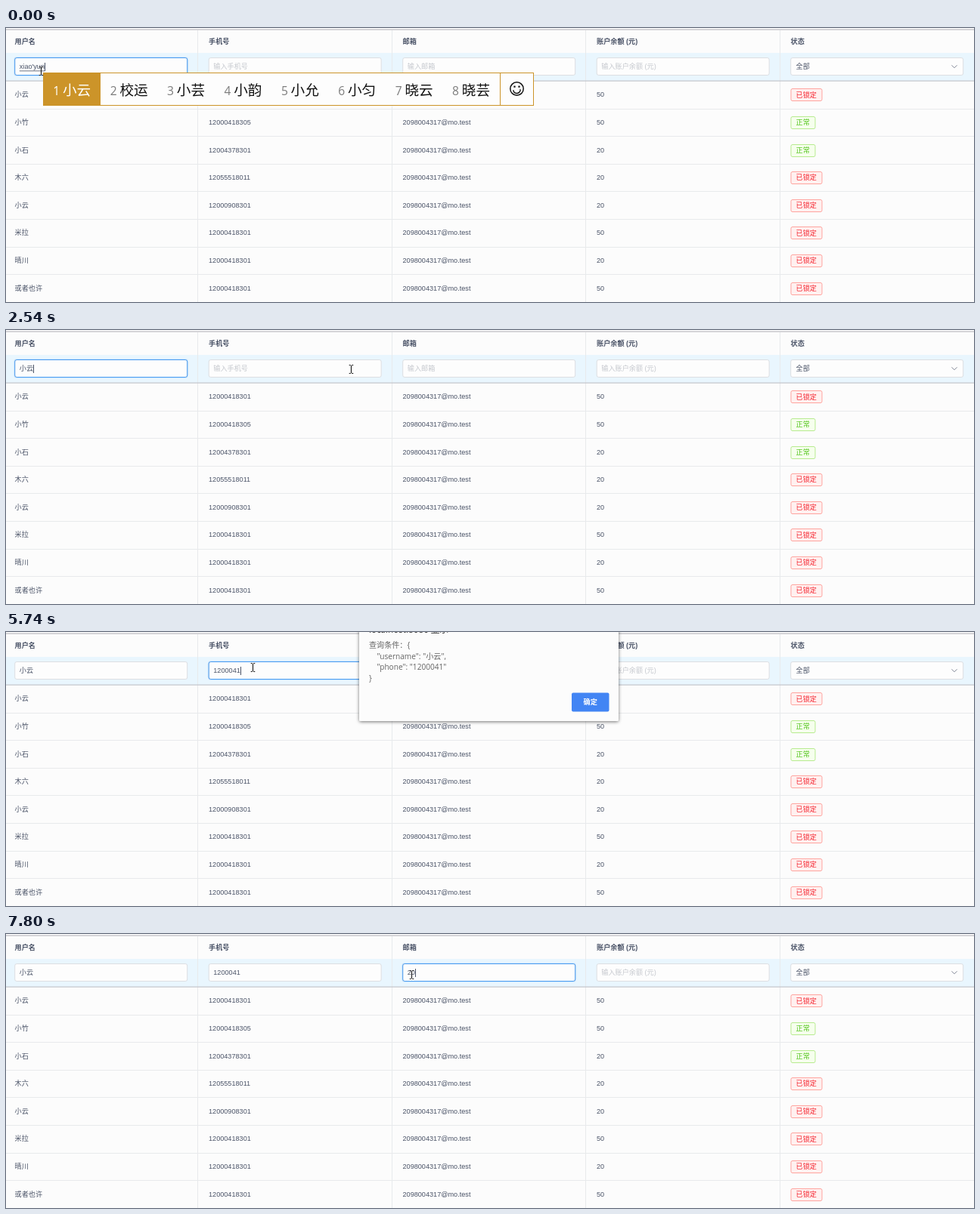
Recreate the animation shown at these times as an HTML page with a canvas. Size 1280x363 px, loop 8 s.

```html
<!DOCTYPE html>
<html lang="zh-CN">
<head>
<meta charset="utf-8">
<title>表格筛选</title>
<style>
html, body { margin: 0; width: 100%; height: 100%; overflow: hidden; background: #fcfcfc; }
canvas { display: block; width: 1280px; height: 363px; }
</style>
</head>
<body>
<canvas id="stage" width="1280" height="363"></canvas>
<script>
const ctx = document.getElementById('stage').getContext('2d');
const LOOP = 8000;
const PAGE_FONT = '"Liberation Sans", "Noto Sans CJK SC", "Noto Sans CJK", sans-serif';
const UI_FONT = '"Open Sans", "Noto Sans CJK SC", "Noto Sans CJK", sans-serif';
const SIZE = 9.15, ROW = 36.6, INK = '#4a5367';
const COL_X = [11.5, 268, 524.5, 781, 1037.5];
const FIELD_W = 228.5, FIELD_Y = 39.5, FIELD_H = 23;

const HEADERS = ['用户名', '手机号', '邮箱', '账户余额 (元)', '状态'];
const HINTS = ['', '输入手机号', '输入邮箱', '输入账户余额 (元)'];
const USER = '小云', QUERY = '1200041', MAIL = '2098004317@mo.test';
const ROWS = [
  [USER, '12000418301', '50', true],
  ['小竹', '12000418305', '50', false],
  ['小石', '12004378301', '20', false],
  ['木六', '12055518011', '20', true],
  [USER, '12000908301', '20', true],
  ['米拉', '12000418301', '50', true],
  ['晴川', '12000418301', '20', true],
  ['或者也许', '12000418301', '50', true]
];
const CANDIDATES = ['小云', '校运', '小芸', '小韵', '小允', '小匀', '晓云', '晓芸'];

// Times at which each character appears
const PHONE_KEYS = [3300, 3720, 3810, 4060, 4270, 4480, 4570];
const MAIL_KEYS = [7510, 7800];

// [time, opacity] steps
const ALERTS = [
  { steps: [[680, 0.67], [770, 1], [2220, 0.6], [2290, 0]],
    lines: ['查询条件：{', `    "username": "${USER}"`, '}'] },
  { steps: [[5130, 0.12], [5200, 0.75], [5280, 1], [6480, 0.95], [6570, 0.3], [6640, 0]],
    lines: ['查询条件：{', `    "username": "${USER}",`, `    "phone": "${QUERY}"`, '}'] }
];

// [time, x, y]
const POINTER = [
  [0, 46, 57], [1200, 46, 57], [2000, 761, 76], [2060, 755, 75], [2130, 723, 64], [2810, 315, 46],
  [5680, 315, 46], [6320, 765, 94], [6400, 765, 94], [6480, 671, 78], [7120, 536, 54], [LOOP, 536, 54]
];

function text(str, x, y, color, size = SIZE, family = PAGE_FONT, weight = 400) {
  ctx.font = `${weight} ${size}px ${family}`;
  ctx.fillStyle = color;
  ctx.fillText(str, x, y);
}

function box(x, y, w, h, fill, stroke, radius = 2.5) {
  ctx.beginPath();
  ctx.roundRect(x, y, w, h, radius);
  if (fill) { ctx.fillStyle = fill; ctx.fill(); }
  if (stroke) { ctx.strokeStyle = stroke; ctx.lineWidth = 1; ctx.stroke(); }
}

function rect(x, y, w, h, color) {
  ctx.fillStyle = color;
  ctx.fillRect(x, y, w, h);
}

function line(points, color, width) {
  ctx.beginPath();
  points.forEach(([x, y]) => ctx.lineTo(x, y));
  ctx.strokeStyle = color;
  ctx.lineWidth = width;
  ctx.stroke();
}

const typed = (str, keys, t) => str.slice(0, keys.filter(k => t >= k).length);

function drawTable() {
  rect(0, 0, 1280, 363, '#fcfcfc');
  rect(0, 33, 1280, 37, '#e9f6fe');
  for (let i = 1; i < 5; i++) {
    const x = Math.round(256.6 * i - 3.4);
    rect(x, 3, 1, 360, '#e8eaec');
  }
  rect(0, 1.5, 1280, 1.2, '#bcbbc1');
  rect(0, 69.5, 1280, 1.2, '#c3c5cc');
  HEADERS.forEach((h, i) => text(h, COL_X[i], 21.4, INK, SIZE, PAGE_FONT, 700));

  ROWS.forEach(([name, phone, money, locked], i) => {
    const mid = 88.3 + ROW * i, base = mid + 3;
    rect(0, Math.round(106.6 + ROW * i), 1280, 1, '#e8eaec');
    [name, phone, MAIL, money].forEach((s, c) => text(s, COL_X[c], base, INK));
    const [label, w, ink, bg, edge] = locked
      ? ['已锁定', 41, '#f5222d', '#fff1f0', '#ffa39e']
      : ['正常', 32, '#52c41a', '#f6ffed', '#b7eb8f'];
    box(1038, Math.round(mid - 8) + 0.5, w, 16, bg, edge, 2);
    text(label, 1044.5, base + 0.3, ink);
  });
}

function focusOf(t) {
  const toPhone = t < 2900 ? 0 : t < 2960 ? 0.5 : 1;
  const toMail = t < 7040 ? 0 : t < 7110 ? 0.5 : 1;
  return [1 - toPhone, toPhone * (1 - toMail), toMail, 0];
}

function drawFilters(t) {
  const composing = t < 120;
  const values = [
    composing ? "xiao'yun" : USER,
    typed(QUERY, PHONE_KEYS, t),
    typed(MAIL, MAIL_KEYS, t),
    ''
  ];
  const focus = focusOf(t);
  values.forEach((value, i) => {
    const x = COL_X[i] + 0.2, tx = COL_X[i] + 6.3;
    box(x, FIELD_Y, FIELD_W - 0.5, FIELD_H, '#fdfdfd', '#dcdee2');
    if (focus[i]) {
      ctx.globalAlpha = focus[i];
      box(x - 1, FIELD_Y - 1, FIELD_W + 1.5, FIELD_H + 2, null, 'rgba(45,140,240,.15)', 3.5);
      box(x, FIELD_Y, FIELD_W - 0.5, FIELD_H, null, '#4b9df2');
      ctx.globalAlpha = 1;
    }
    text(value || HINTS[i], tx, 54.3, value ? INK : '#c5c8ce');
    if (focus[i] > 0.5) {
      const w = value ? ctx.measureText(value).width : 0;
      rect(Math.round(tx + w), 46, 1, 11, INK);
    }
  });
  if (composing) rect(17.8, 56.5, 33.5, 0.8, INK);

  box(COL_X[4] + 0.2, FIELD_Y, FIELD_W - 0.5, FIELD_H, '#fdfdfd', '#dcdee2');
  text('全部', 1044.5, 54.3, INK);
  line([[1250.5, 49.3], [1254, 52.8], [1257.5, 49.3]], '#808695', 1);
}

function drawCandidates() {
  rect(49, 59, 649, 44, '#fdfdfd');
  ctx.strokeStyle = '#cc9429';
  ctx.lineWidth = 1;
  ctx.strokeRect(49.5, 59.5, 648, 43);
  rect(49, 59, 76, 44, '#cc9429');
  rect(653, 59, 1, 44, '#cc9429');
  CANDIDATES.forEach((word, i) => {
    const x = 62.3 + 75.4 * i;
    text(i + 1, x, 88.7, i ? '#7d7d7d' : '#fff', 15.6, UI_FONT);
    text(word, x + 12.7, 89.2, i ? '#111' : '#fff', 18.6, UI_FONT);
  });
  ctx.strokeStyle = '#111';
  ctx.lineWidth = 1.5;
  ctx.beginPath();
  ctx.arc(675.5, 80.5, 8.7, 0, 7);
  ctx.moveTo(680.2, 82.3);
  ctx.arc(675.5, 81.8, 4.7, 0.1, Math.PI - 0.1);
  ctx.stroke();
  rect(671.4, 76.6, 2.2, 2.2, '#111');
  rect(677.4, 76.6, 2.2, 2.2, '#111');
}

function opacityAt(steps, t) {
  let a = 0;
  for (const [time, value] of steps) if (t >= time) a = value;
  return a;
}

// Panel whose shadow falls only outside it, so it stays clean when translucent
function drawPanel(x, y, w, h) {
  ctx.save();
  ctx.beginPath();
  ctx.rect(-10, -100, 1300, 600);
  ctx.roundRect(x, y, w, h, 2);
  ctx.clip('evenodd');
  ctx.shadowColor = 'rgba(0,0,0,.55)';
  ctx.shadowBlur = 4;
  ctx.shadowOffsetY = 1;
  box(x, y, w, h, '#fcfcfc', null, 2);
  ctx.restore();
  box(x, y, w, h, '#fcfcfc', null, 2);
}

function drawAlert({ steps, lines }, t) {
  const a = opacityAt(steps, t);
  if (!a) return;
  const grow = 3 * (1 - a), bottom = 59.7 + 14.6 * lines.length;
  ctx.save();
  ctx.globalAlpha = a;
  ctx.translate(0, -10 * Math.sqrt(1 - a));
  drawPanel(467 - grow, -40, 343 + 2 * grow, 40 + bottom);
  text('localhost:8080 显示', 480, 0.8, '#333', 11.7, UI_FONT);
  lines.forEach((s, i) => text(s, 480, 21 + 14.6 * i, '#646464', 10.1, UI_FONT));
  box(748 + grow * 0.7, bottom - 37.7, 49.5, 25, '#4285f4', null, 2);
  text('确定', 763.5 + grow * 0.7, bottom - 21.7, '#fff', SIZE, UI_FONT, 600);
  ctx.restore();
}

function pointerAt(t) {
  const i = POINTER.findIndex(p => p[0] > t);
  const [t0, x0, y0] = POINTER[i - 1], [t1, x1, y1] = POINTER[i];
  const u = (t - t0) / (t1 - t0), e = u * u * (3 - 2 * u);
  return [x0 + (x1 - x0) * e, y0 + (y1 - y0) * e];
}

function drawPointer(t) {
  const [x, y] = pointerAt(t);
  const covered = x > 467 && x < 810 && ALERTS.some(a => opacityAt(a.steps, t));
  const inField = y > 39 && y < 63 && COL_X.slice(0, 4).some(c => x >= c && x <= c + FIELD_W);
  ctx.save();
  ctx.translate(Math.round(x), Math.round(y));
  if (inField && !covered) {
    ctx.translate(0.5, 0);
    line([[0, -5], [0, 5]], '#222', 1.2);
    for (const end of [-5.5, 5.5]) {
      line([[-2.8, end], [-0.7, end]], '#222', 1);
      line([[0.7, end], [2.8, end]], '#222', 1);
    }
  } else {
    ctx.beginPath();
    [[0, 0], [0, 12.6], [2.8, 10], [4.8, 14.4], [6.7, 13.5], [4.8, 9.2], [8.6, 9]]
      .forEach(p => ctx.lineTo(...p));
    ctx.closePath();
    ctx.fillStyle = '#fff';
    ctx.fill();
    ctx.strokeStyle = '#111';
    ctx.lineWidth = 0.9;
    ctx.stroke();
  }
  ctx.restore();
}

function draw(now) {
  const t = now % LOOP;
  drawTable();
  drawFilters(t);
  if (t < 120) drawCandidates();
  ALERTS.forEach(a => drawAlert(a, t));
  drawPointer(t);
}

const start = performance.now();
function tick() {
  draw(performance.now() - start);
  requestAnimationFrame(tick);
}
tick();
</script>
</body>
</html>
```
